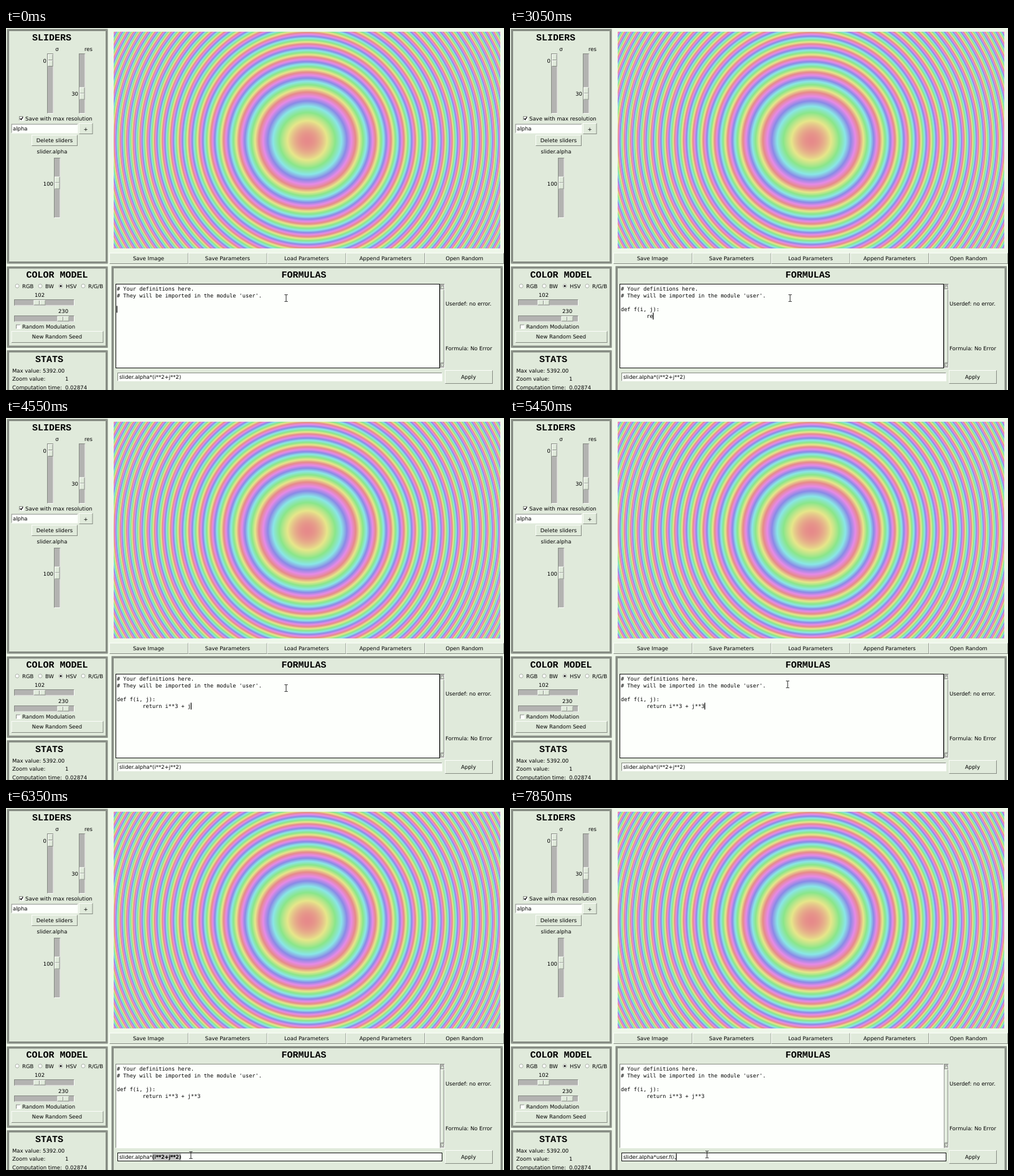
Write an HTML page with a canvas that moves like this. It is 800 px wide and 583 px high and loops after 8 s.

```html
<!DOCTYPE html>
<html lang="en">
<head>
<meta charset="utf-8">
<title>Formula editor</title>
<style>
  html, body { margin: 0; width: 100%; height: 100%; overflow: hidden; background: #eef7e9; }
  canvas, svg { position: absolute; left: 0; top: 0; }
  canvas { left: 173px; top: 6px; }
  text { font: 8.5px "DejaVu Sans", sans-serif; fill: #000; white-space: pre; text-rendering: geometricPrecision; }
  .title { font: bold 15px "Courier New", "Liberation Mono", monospace; }
  .code { font: 8.6px "DejaVu Sans Mono", monospace; }
  .picked { stroke: #000; stroke-width: .12px; }
</style>
</head>
<body>
<canvas id="rings" width="621" height="349"></canvas>
<svg id="ui" width="800" height="583" viewBox="0 0 800 583"></svg>
<script>
const BG = '#e0eadb', DARK = '#868c83', LIGHT = '#fbfdf9', TROUGH = '#b3b3b1', FIELD = '#fdfffc';
const ui = document.getElementById('ui');

function add(tag, attrs, content = '') {
  const node = document.createElementNS('http://www.w3.org/2000/svg', tag);
  for (const name in attrs) node.setAttribute(name, attrs[name]);
  node.textContent = content;
  ui.append(node);
  return node;
}
const rect = (x, y, width, height, fill) => add('rect', { x, y, width, height, fill });
const label = (content, x, y, anchor = 'start', cls = '') =>
  add('text', { x, y, 'text-anchor': anchor, class: cls }, content);

// Two mitred edges: top-left in one colour, bottom-right in the other.
function bevel(x, y, w, h, b, topLeft, bottomRight) {
  const r = x + w, d = y + h;
  add('path', { fill: topLeft, d: `M${x},${y}H${r}l${-b},${b}H${x + b}V${d - b}l${-b},${b}z` });
  add('path', { fill: bottomRight, d: `M${r},${d}H${x}l${b},${-b}H${r - b}V${y + b}l${b},${-b}z` });
}
function panel(x, y, w, h) {
  rect(x, y, w, h, BG);
  bevel(x, y, w, h, 3.5, DARK, DARK);
}
function raised(x, y, w, h) {
  rect(x, y, w, h, BG);
  bevel(x, y, w, h, 1, LIGHT, DARK);
}
function sunken(x, y, w, h, fill) {
  rect(x, y, w, h, fill);
  bevel(x, y, w, h, 1, DARK, LIGHT);
}
function button(content, x, y, w, h, cx, baseline) {
  raised(x, y, w, h);
  label(content, cx, baseline, 'middle');
}
function slider(x, y, w, h, pos) {
  sunken(x, y, w, h, TROUGH);
  if (h > w) {
    raised(x + 1, pos - 10, w - 2, 20);
    rect(x + 2, pos - 1, w - 4, 1, DARK);
    rect(x + 2, pos, w - 4, 1, LIGHT);
  } else {
    raised(pos - 9.5, y + 1, 19, h - 2);
    rect(pos - 1, y + 2, 1, h - 4, DARK);
    rect(pos, y + 2, 1, h - 4, LIGHT);
  }
}
function check(content, x, y, on) {
  sunken(x, y, 7.5, 7.5, '#fff');
  if (on) add('path', { d: `M${x + 1.6},${y + 3.6}l1.7,2l3,-4.2`, fill: 'none', stroke: '#000', 'stroke-width': 1.3 });
  label(content, x + 10, y + 6.7);
}
function radio(content, x, on) {
  add('circle', { cx: x, cy: 415.5, r: 3, fill: '#fff', stroke: '#979d94', 'stroke-width': .8 });
  if (on) add('circle', { cx: x, cy: 415.5, r: 1.6, fill: '#000' });
  label(content, x + 8, 419);
}

function paintRings() {
  const canvas = document.getElementById('rings'), ctx = canvas.getContext('2d');
  const { width, height } = canvas, image = ctx.createImageData(width, height);
  const channel = (hue, n) => {
    const k = (n + hue * 6) % 6;
    return 230 * (1 - .4 * Math.max(0, Math.min(k, 4 - k, 1)));
  };
  for (let y = 0, p = 0; y < height; y++) for (let x = 0; x < width; x++) {
    const hue = ((x - 310.5) ** 2 + (y - 174.5) ** 2) / 6023 % 1;
    for (const n of [5, 3, 1]) image.data[p++] = channel(hue, n);
    image.data[p++] = 255;
  }
  ctx.putImageData(image, 0, 0);
}

function drawSliders() {
  panel(1.5, 1.5, 162, 378);
  label('SLIDERS', 73.5, 20, 'middle', 'title');
  label('σ', 82, 37, 'middle');
  label('res', 132.5, 37, 'middle');
  slider(66, 41, 10.5, 97, 52);
  label('0', 65, 55.5, 'end');
  slider(117, 41, 10.5, 97, 105.5);
  label('30', 116, 109, 'end');
  check('Save with max resolution', 21, 142, true);
  sunken(8.5, 154.5, 107, 15, FIELD);
  label('alpha', 11, 165);
  button('+', 117, 153, 22.5, 18, 128, 165.5);
  button('Delete sliders', 41, 172, 74, 18, 78, 184);
  label('slider.alpha', 74, 202, 'middle');
  slider(77, 209, 10.5, 97, 249.5);
  label('100', 76, 254, 'end');
}
function drawColorModel() {
  panel(1.5, 384, 162, 131);
  label('COLOR MODEL', 82, 402, 'middle', 'title');
  radio('RGB', 18);
  radio('BW', 55);
  radio('HSV', 88, true);
  radio('R/G/B', 124);
  label('102', 54, 433, 'middle');
  slider(13, 437, 97, 10.5, 54);
  label('230', 92, 459, 'middle');
  slider(13, 463, 97, 10.5, 92);
  check('Random Modulation', 16, 477.5, false);
  button('New Random Seed', 8.5, 488, 148, 19, 82, 500);
}
function drawStats() {
  panel(1.5, 519, 162, 90);
  label('STATS', 69.5, 538, 'middle', 'title');
  label('Max value: 5392.00', 10, 555);
  label('Zoom value:', 10, 568);
  label('1', 95, 568);
  label('Computation time:', 10, 581.5);
  label('0.02874', 95, 581.5);
}
function drawFormulas() {
  ['Save Image', 'Save Parameters', 'Load Parameters', 'Append Parameters', 'Open Random']
    .forEach((name, i) => button(name, 166 + i * 126.8, 362, 126.8, 18, 229 + i * 126.9, 374));
  panel(169.5, 383.5, 628.5, 230);
  label('FORMULAS', 478.5, 402, 'middle', 'title');
  sunken(176, 412, 521, 136, FIELD);
  label('# Your definitions here.', 178, 423, 'start', 'code');
  label("# They will be imported in the module 'user'.", 178, 434, 'start', 'code');
  sunken(697, 412, 8, 136, TROUGH);
  raised(698, 421, 6, 118.5);
  add('path', { d: 'M701,414.5l3,5h-6z', fill: BG, stroke: DARK, 'stroke-width': .6 });
  add('path', { d: 'M701,546l3,-5h-6z', fill: BG, stroke: DARK, 'stroke-width': .6 });
  label('Userdef: no error.', 706, 447);
  label('Formula: No Error', 706, 518.5);
  sunken(179, 555, 522, 14, FIELD);
  button('Apply', 705, 551, 77, 22, 743, 565);
}

paintRings();
drawSliders();
drawColorModel();
drawStats();
drawFormulas();

const frame = (x, y, width, height) =>
  add('rect', { x, y, width, height, fill: 'none', stroke: '#111', 'stroke-width': 1 });
const areaFocus = frame(176.5, 412.5, 520, 135);
const entryFocus = frame(179.5, 555.5, 521, 13);
const lines = [456, 467].map(y => label('', 178, y, 'start', 'code'));
const selection = rect(0, 556.5, 0, 11, '#c3c3c3');
const entry = label('', 182, 565);
const picked = label('', 0, 565, 'start', 'picked');
const areaCaret = rect(0, 0, 1.2, 11, '#000');
const entryCaret = rect(0, 556.5, 1.2, 11, '#000');
const mouse = add('path', {
  d: 'M-2.5,-5.5H-.6L0,-5L.6,-5.5H2.5M0,-5V5M-2.5,5.5H-.6L0,5L.6,5.5H2.5',
  fill: 'none', stroke: '#222', 'stroke-width': 1
});

const LOOP = 8000, STEP = 50, FOCUS = 5900, DRAG = 6000, CUT = 6700;
const PREFIX = 'slider.alpha*', OLD = '(i**2+j**2)';
const MONO = 8.6 * .602;

// Keystrokes; 'on' and 'off' switch the caret, 'back' deletes.
const areaKeys = [
  [150, 'd'], [250, 'e'], [300, 'f'], [400, ' '], [550, 'f'], [600, '('], [700, 'i'], [750, 'back'],
  [1050, 'i'], [1150, ','], [1200, ' '], [1350, 'j'], [1450, 'off'], [1650, ')'], [1700, 'on'],
  [2000, 'off'], [2150, ':'], [2250, 'on'], [2450, 'off'], [2600, '\n'], [2600, 'on'], [2700, '        '],
  [2900, 'r'], [3050, 'e'], [3100, 't'], [3150, 'u'], [3250, 'r'], [3300, 'n'], [3350, 'off'],
  [3500, ' '], [3500, 'on'], [3550, 'off'], [3800, 'i'], [3950, 'on'], [4050, '*'], [4100, '*'], [4200, '3'],
  [4300, ' '], [4350, '+'], [4400, ' '], [4550, 'j'], [4700, '*'], [4800, '*'], [4950, '3'],
  [5150, 'off'], [5300, 'on'], [FOCUS, 'off']
];
const entryKeys = [
  [CUT, 'u'], [CUT, 'on'], [6800, 's'], [6850, 'e'], [6950, 'r'], [7050, '.'], [7100, 'f'], [7250, '('],
  [7300, 'off'], [7400, 'on'], [7650, 'i'], [7700, 'off'], [7850, ','], [7850, 'on']
];
const mousePath = [
  [5400, 450, 435], [5450, 446, 429], [5850, 237, 562], [DRAG, 236, 562],
  [6250, 276, 560], [6350, 297, 559], [6500, 316.5, 558]
];

function typed(keys, t, caret) {
  let text = '';
  for (const [when, key] of keys) {
    if (when > t) break;
    if (key === 'on' || key === 'off') caret = key === 'on';
    else text = key === 'back' ? text.slice(0, -1) : text + key;
  }
  return { text, caret };
}
function mouseAt(t) {
  const next = mousePath.findIndex(p => p[0] > t);
  if (next === 0) return mousePath[0].slice(1);
  if (next < 0) return mousePath[mousePath.length - 1].slice(1);
  const [t0, x0, y0] = mousePath[next - 1], [t1, x1, y1] = mousePath[next];
  const k = (t - t0) / (t1 - t0);
  return [x0 + (x1 - x0) * k, y0 + (y1 - y0) * k];
}
const show = (node, on) => node.setAttribute('visibility', on ? 'visible' : 'hidden');

function drawArea(t) {
  const { text, caret } = typed(areaKeys, t, true);
  const rows = text.split('\n'), last = rows.length - 1;
  lines.forEach((line, i) => line.textContent = rows[i] || '');
  areaCaret.setAttribute('x', 177.7 + rows[last].length * MONO);
  areaCaret.setAttribute('y', 447.5 + last * 11);
  show(areaCaret, caret);
  show(areaFocus, t < FOCUS);
}
function drawEntry(t, mouseX) {
  const { text, caret } = typed(entryKeys, t, false);
  entry.textContent = PREFIX + (t < CUT ? OLD : text);
  entryCaret.setAttribute('x', 181.7 + entry.getComputedTextLength());
  show(entryCaret, caret);
  show(entryFocus, t >= FOCUS);

  const width = n => entry.getSubStringLength(0, PREFIX.length + n);
  let count = 0;
  if (t >= DRAG && t < CUT) while (count < OLD.length && 182 + width(count + 1) <= mouseX + 2) count++;
  const start = 182 + width(0);
  selection.setAttribute('x', start);
  selection.setAttribute('width', count ? 182 + width(count) - start : 0);
  picked.setAttribute('x', start);
  picked.textContent = OLD.slice(0, count);
}
function tick(now) {
  const t = Math.floor(now % LOOP / STEP) * STEP;
  const [x, y] = mouseAt(t);
  drawArea(t);
  drawEntry(t, x);
  mouse.setAttribute('transform', `translate(${x},${y})`);
  requestAnimationFrame(() => tick(performance.now() - begin));
}
const begin = performance.now();
tick(0);
</script>
</body>
</html>
```
